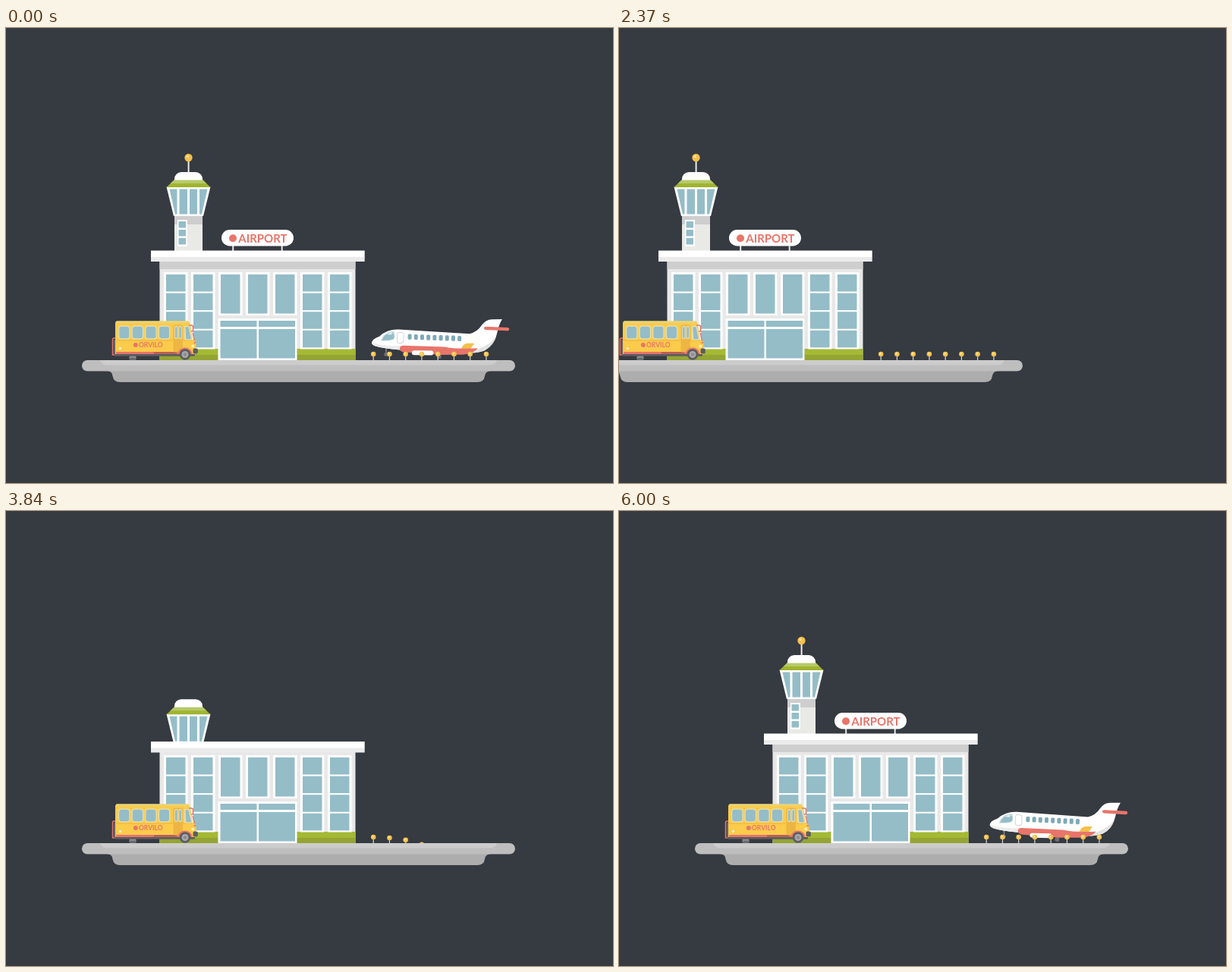
Animation of 800x600 px, one loop 6.03 s. Source, as an HTML page with a canvas:

```html
<!DOCTYPE html>
<html lang="en">
<head>
<meta charset="utf-8">
<title>Airport</title>
<style>
html, body { margin: 0; width: 100%; height: 100%; overflow: hidden; background: #363a41; }
canvas { display: block; width: 800px; height: 600px; }
</style>
</head>
<body>
<canvas id="stage" width="800" height="600"></canvas>
<script>
const ctx = document.getElementById('stage').getContext('2d');
const LOOP = 6030;
const GROUND_Y = 438;
const C = {
  bg: '#363a41', white: '#ffffff', wall: '#e8e8e8', band: '#cecece', glass: '#94bdc8',
  green: '#a4b934', moss: '#94a534', lime: '#b6c968', yellow: '#fbcb4b', gold: '#f4c04b',
  coral: '#e8756a', dark: '#5d5c60', grey: '#8d8d90'
};

const clamp = v => Math.max(0, Math.min(1, v));
const prog = (t, start, dur) => clamp((t - start) / dur);
const easeOut = (p, n) => 1 - Math.pow(1 - p, n);
const backOut = (p, s) => 1 + (s + 1) * Math.pow(p - 1, 3) + s * Math.pow(p - 1, 2);

function rect(color, x, y, w, h) {
  ctx.fillStyle = color;
  ctx.fillRect(x, y, w, h);
}
function round(color, x, y, w, h, r) {
  ctx.fillStyle = color;
  ctx.beginPath();
  ctx.roundRect(x, y, w, h, r);
  ctx.fill();
}
function disc(color, x, y, r) {
  ctx.fillStyle = color;
  ctx.beginPath();
  ctx.arc(x, y, r, 0, Math.PI * 2);
  ctx.fill();
}
function shape(color, d) {
  ctx.fillStyle = color;
  ctx.fill(new Path2D(d));
}
function line(color, width, d) {
  ctx.strokeStyle = color;
  ctx.lineWidth = width;
  ctx.stroke(new Path2D(d));
}
function label(str, x, y, size) {
  ctx.font = `bold ${size}px Lato, sans-serif`;
  ctx.fillStyle = C.coral;
  ctx.fillText(str, x, y);
}
function group(dx, dy, draw) {
  ctx.save();
  ctx.translate(dx, dy);
  draw();
  ctx.restore();
}

function ground() {
  shape('#adadad', 'M132 451 V452 Q140 452 140.5 459 Q142 467 150 467 H621 Q630 467 631 459 Q632 452 640 452 V451 Z');
  round('#bebebe', 100, 438, 571, 14.5, 7.2);
  shape('#cccccc', 'M124 438 H647 Q645 444.5 637 444.5 H134 Q126 444.5 124 438 Z');
}

function lamp(x) {
  rect('#d8d8d8', x - 0.6, 431, 1.2, 8);
  disc(C.gold, x, 430, 3.3);
  disc('#fbe3a0', x - 0.6, 429.4, 1.3);
}

function antenna() {
  rect('#ececec', 239.6, 175, 2, 16);
  disc(C.gold, 240.5, 171, 5.2);
  disc('#fbe09a', 239.3, 169.5, 1.8);
}

function tower() {
  rect('#e9eae6', 222, 247, 37, 58);
  rect(C.band, 222, 248, 37, 11);
  rect(C.white, 226, 253, 13, 35);
  for (let i = 0; i < 3; i++) rect(C.glass, 227.5, 255 + i * 11, 9.5, 8.5);
  shape(C.white, 'M211.5 209.5 H269.5 L260 248 H221 Z');
  shape(C.glass, 'M215.5 212.5 H225.5 V245.5 H223 Z M228.5 212.5 H239 V245.5 H228.5 Z M242 212.5 H252 V245.5 H242 Z M255 212.5 H265.5 L258 245.5 H255 Z');
  shape('#a0b42f', 'M222 200 H259 L269.5 210 H211.5 Z');
  shape(C.lime, 'M222 200 H259 L264.2 205 H216.8 Z');
  round(C.white, 222, 190, 37, 10.5, [9, 9, 0, 0]);
}

function sign() {
  rect('#e6e6e6', 298.2, 286, 2, 12);
  rect('#e6e6e6', 362.7, 286, 2, 12);
  round(C.white, 284, 266, 95, 21.5, 10.7);
  disc(C.coral, 299, 277.2, 5);
  label('AIRPORT', 306.3, 282.6, 15);
}

function walls() {
  rect(C.wall, 202.5, 307, 258, 131);
  rect(C.band, 202.5, 307, 258, 11);
  rect(C.green, 202.5, 423, 258, 8);
  rect(C.moss, 202.5, 431, 258, 7);
  for (let i = 0; i < 7; i++) {
    const x = 208 + i * 36;
    const tall = i > 1 && i < 5;
    rect(C.white, x, 322, 31.5, tall ? 57 : 101.5);
    if (tall) {
      rect(C.glass, x + 3, 325, 25.5, 51.5);
    } else {
      for (let j = 0; j < 4; j++) rect(C.glass, x + 3, 325 + j * 24.6, 25.5, 22.5);
    }
  }
  rect(C.white, 279.5, 383, 104, 55);
  for (const x of [282.5, 333]) {
    rect(C.glass, x, 386, 48, 8);
    rect(C.glass, x, 397, 48, 38.5);
  }
}

function roof() {
  rect(C.white, 191, 293.5, 281.7, 9);
  rect('#ebebeb', 191, 302, 281.7, 6);
}

function bus() {
  // rear ladder and rear axle
  line(C.coral, 1.5, 'M145 409 H142 Q140.5 409 140.5 411 V431 H146');
  line(C.grey, 1, 'M143 411 V430');
  round(C.grey, 162.5, 432, 9, 5.5, 1.5);
  rect(C.dark, 163.5, 435, 7, 1.5);
  round(C.dark, 143, 429, 106, 3.8, 1.5);

  shape(C.yellow, 'M144 389 Q144 387 146 387 H239 Q242 387 242.5 390 L246 411 Q250.5 412 250.5 417 V430 H144 Z');
  round('#e9d477', 145, 386.3, 96, 2.8, 1.4);
  rect('#f0b53d', 144.5, 411.5, 101, 1);
  rect(C.coral, 145, 427, 86, 3);
  rect('#a75b50', 195, 427.5, 30, 2);
  for (let i = 0; i < 4; i++) {
    const x = 148 + i * 17.6;
    round('#e6dfb0', x, 392.5, 15.5, 18, 4);
    round(C.glass, x + 1.2, 393.7, 13.1, 15.6, 3);
  }
  round('#edb643', 220.5, 391.5, 12.5, 36, 2);
  for (const x of [222, 227.4]) {
    round('#e6dfb0', x, 393, 4.5, 17, 1.5);
    rect(C.glass, x + 0.9, 394.5, 2.7, 14);
  }
  shape('#e6dfb0', 'M235 393 H241.5 L245.5 411.5 H237 Q235 411.5 235 409 Z');
  shape(C.glass, 'M236.3 394.3 H240.5 L244 410.2 H237.3 Z');
  line(C.coral, 1.6, 'M241 392 H244.5 Q246.5 392 246.5 394 V400 H244');
  line(C.coral, 1.3, 'M246 402 L248.3 412');
  disc('#fff0b5', 246.2, 419.5, 2);
  disc(C.coral, 248.8, 415, 1.2);
  round('#f5f0df', 149, 421, 3, 3, 1);
  shape(C.coral, 'M226 430 Q228 421.5 236 421.5 Q244 421.5 246 430 Z');
  round(C.dark, 246.5, 422.5, 6.3, 7, 2);
  disc(C.dark, 236, 430.5, 7.3);
  disc('#a9a9ab', 236, 430.5, 4.5);
  disc(C.grey, 236, 430.5, 2.2);

  disc(C.coral, 170.8, 417.9, 3);
  label('ORVILO', 175, 421, 8.5);
}

function plane() {
  line(C.grey, 1.4, 'M501 422 V430 M571 426 V433');
  disc('#6d6d71', 501, 431, 2.6);
  disc('#6d6d71', 571, 433.3, 3);
  shape(C.white, 'M482 415.5 Q482.5 411 492 407.5 Q502 398 517 398.2 L611 402.8 Q621 400.5 627 391 Q632 383.6 640 383.4 L653.5 383.2 Q649 391 647 402 Q644 417 631 424.5 Q620 429 596 428 L520 425 Q497 423.5 487 420.5 Q481.5 418.5 482 415.5 Z');
  shape('#ececec', 'M482 416 Q500 421 520 419.5 L520 425 Q497 423.5 487 420.5 Q482 418.5 482 416 Z');
  shape('#e3e3e3', 'M622 423 Q640 416 646 405 Q643 418 631 424.5 Q624 427.5 614 428 Z');
  shape(C.gold, 'M600 423 Q602 416 608 415.3 H617 Q615 420 611 424 Z');
  shape(C.coral, 'M519 423.5 Q519 419.3 524 419.3 L578 420.5 Q592 423.5 622 421.8 Q617 429 603 430.3 L574 431 L525 428 Q519 427 519 423.5 Z');
  round(C.white, 535, 425.6, 28.5, 6, 3);
  shape('#c9dde2', 'M494 413.5 Q497 402 511 400.5 Q514 407 511 411.5 Q505 414 494 413.5 Z');
  shape(C.glass, 'M495.5 412.5 Q499 403.5 509 402 Q513 406 510.5 410.8 Q504 413 495.5 412.5 Z');
  shape('#dcebef', 'M502 404.5 Q506 402 509.5 402 L508 405 Q505 406 502 404.5 Z');
  ctx.strokeStyle = '#d5d5d5';
  ctx.lineWidth = 1;
  ctx.beginPath();
  ctx.roundRect(515.5, 402, 8.5, 14, 3);
  ctx.stroke();
  for (let i = 0; i < 9; i++) round('#7fa9b6', 529.5 + i * 8.2, 404 + i * 0.2, 5, 7.2, 1.6);
  shape(C.coral, 'M632 393.2 L661 394 Q663.5 394.3 663 397 Q662.5 398.6 660 398.4 L632 397.4 Q629.5 397 629.7 395 Q630 393.2 632 393.2 Z');
}

// Glide in from the right, touch down, and roll behind the building.
function drawPlane(t) {
  const time = t < 1800 ? t + LOOP : t;
  if (time < 4600) return;
  const u = (time - LOOP) / 1000;
  const dx = -217 * u + 27 * u * u + 12 * u * u * u;
  const dy = -57 * Math.pow(Math.max(0, -u) / 1.14, 1.5);
  const tilt = 4.5 * (1 - prog(time, 5850, 210));
  group(571 + dx, 436 + dy, () => {
    ctx.rotate(tilt * Math.PI / 180);
    ctx.translate(-571, -436);
    plane();
  });
}

function drawBus(b) {
  const p = prog(b, 3150, 420);
  if (p <= 0) return;
  const e = easeOut(p, 2.4);
  const x = 132 + 65 * p;
  const y = 430 - 18 * p - 62.7 * 4 * p * (1 - p);
  group(x, y, () => {
    ctx.rotate(-210 * (1 - e) * Math.PI / 180);
    ctx.scale(e, e);
    ctx.translate(-197, -412);
    bus();
  });
}

function drawScene(t) {
  const leaving = t < 2840;
  const b = leaving ? LOOP : t;
  const s = Math.max(0, t - 1800) / 1000;
  const slide = leaving ? 400 * s * s + 248 * Math.pow(s, 6) : 0;

  group(-slide, 0, () => {
    // everything that rises stays hidden below ground level
    ctx.save();
    ctx.beginPath();
    ctx.rect(-800, 0, 2400, GROUND_Y + 1);
    ctx.clip();

    drawPlane(t);
    if (b > 4560) group(0, 24 * (1 - easeOut(prog(b, 4560, 440), 2)), antenna);
    if (b > 3765) group(0, 104 * (1 - backOut(prog(b, 3765, 600), 1.1)), tower);
    if (b > 4510) group(0, 30 * (1 - easeOut(prog(b, 4510, 445), 2)), sign);

    if (b > 3270) {
      const lift = 144.5 * (1 - easeOut(prog(b, 3295, 400), 3));
      const dip = 10.5 * Math.pow(Math.sin(Math.PI * prog(b, 3715, 250)), 2);
      group(0, lift, walls);
      group(0, lift + dip, roof);
    }
    for (let i = 0; i < 8; i++) {
      const p = prog(b, 3514 + i * 100, 400);
      if (p > 0) group(0, 12 * Math.pow(1 - p, 3), () => lamp(484.2 + i * 21.25));
    }
    ctx.restore();

    const wide = easeOut(prog(b, 3060, 540), 3);
    if (wide > 0) {
      ctx.save();
      ctx.translate(385.5, 0);
      ctx.scale(wide, 1);
      ctx.translate(-385.5, 0);
      ground();
      ctx.restore();
    }
    drawBus(b);
  });
}

function frame() {
  const t = performance.now() % LOOP;
  rect(C.bg, 0, 0, 800, 600);
  if (t < 2820 || t > 3050) drawScene(t);
  requestAnimationFrame(frame);
}
frame();
</script>
</body>
</html>
```
